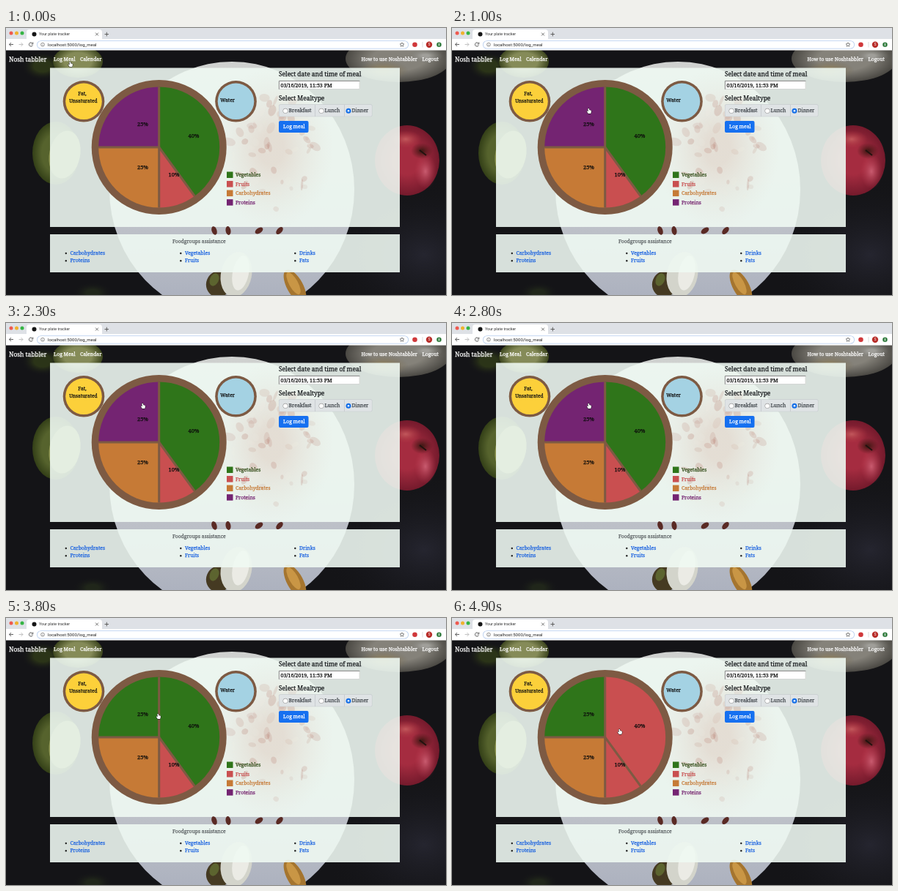
Recreate the animation shown at these times as an HTML page with a canvas. Size 600 by 365 pixels, loop 5000 ms.

```html
<!DOCTYPE html>
<html lang="en">
<head>
<meta charset="utf-8">
<title>Your plate tracker</title>
<style>
  html, body { margin: 0; width: 100%; height: 100%; overflow: hidden; background: #111; }
  canvas { display: block; width: 600px; height: 365px; }
</style>
</head>
<body>
<canvas id="stage"></canvas>
<script>
const W = 600, H = 365, LOOP = 5000, STEP = 100, TAU = Math.PI * 2;
const SERIF = '"Noto Serif", serif', SANS = 'Roboto, sans-serif';
const BROWN = '#7d5a43', BLUE = '#1a62e0', PANEL = 'rgba(240,250,243,.89)';
const FOOD = { veg: '#2f751a', fruit: '#c94f50', carb: '#c67a36', protein: '#742472' };

const dpr = window.devicePixelRatio || 1;
const stage = document.getElementById('stage');
const page = document.createElement('canvas');
for (const c of [stage, page]) {
  c.width = W * dpr;
  c.height = H * dpr;
  c.getContext('2d').scale(dpr, dpr);
}
const view = stage.getContext('2d');
let g = page.getContext('2d');

function rect(x, y, w, h, color, r = 0) {
  g.fillStyle = color;
  g.beginPath();
  g.roundRect(x, y, w, h, r);
  g.fill();
}

function oval(x, y, rx, ry, color, tilt = 0) {
  g.fillStyle = color;
  g.beginPath();
  g.ellipse(x, y, rx, ry, tilt, 0, TAU);
  g.fill();
}

const disc = (x, y, r, color) => oval(x, y, r, r, color);

function line(color, width, ...pts) {
  g.strokeStyle = color;
  g.lineWidth = width;
  g.beginPath();
  for (let i = 0; i < pts.length; i += 2) g.lineTo(pts[i], pts[i + 1]);
  g.stroke();
}

function ring(x, y, r, color, width, from = 0, to = TAU) {
  g.strokeStyle = color;
  g.lineWidth = width;
  g.beginPath();
  g.arc(x, y, r, from, to);
  g.stroke();
}

// A hairline stroke gives the serif text a medium weight
function text(str, x, y, size, color, { font = SERIF, align = 'left', ink = 0.25 } = {}) {
  g.font = `${size}px ${font}`;
  g.textAlign = align;
  g.fillStyle = g.strokeStyle = color;
  g.fillText(str, x, y);
  if (font === SERIF) {
    g.lineWidth = ink;
    g.strokeText(str, x, y);
  }
}

// Soft round glow, stretched to an ellipse
function glow(x, y, rx, ry, inner, outer, hold = 0) {
  g.save();
  g.translate(x, y);
  g.scale(1, ry / rx);
  const fill = g.createRadialGradient(0, 0, rx * hold, 0, 0, rx);
  fill.addColorStop(0, inner);
  fill.addColorStop(1, outer);
  disc(0, 0, rx, fill);
  g.restore();
}

function seeded(seed) {
  return () => (seed = (seed * 16807) % 2147483647) / 2147483647;
}

function drawPhoto() {
  rect(0, 0, W, H, '#141417');
  glow(570, 310, 140, 110, '#25252f', 'rgba(20,20,23,0)');
  // Avocados
  glow(50, 52, 30, 20, '#2b3418', 'rgba(20,20,23,0)', 0.4);
  glow(98, 46, 34, 22, '#858b58', '#3c451e', 0.55);
  glow(68, 171, 32, 43, '#56632d', '#333f17', 0.6);
  oval(80, 173, 21, 33, '#8c9450', 0.2);
  glow(118, 362, 28, 15, '#20261a', 'rgba(20,20,23,0)', 0.3);
  // Glass jar
  glow(535, 42, 72, 32, '#85827a', '#4a4843', 0.5);
  glow(515, 58, 34, 14, '#8d805f', 'rgba(120,110,90,0)', 0.2);
  glow(572, 38, 24, 10, '#a09f9a', 'rgba(120,120,115,0)', 0.2);
  // Apple
  glow(547, 181, 44, 48, '#a52c40', '#741a2c', 0.4);
  glow(572, 196, 15, 24, 'rgba(214,105,125,.8)', 'rgba(190,60,80,0)');
  glow(545, 152, 22, 12, 'rgba(205,100,100,.8)', 'rgba(190,60,70,0)');
  glow(567, 168, 15, 11, '#4a1a18', 'rgba(90,25,30,0)', 0.15);
  line('#21130f', 2, 564, 167, 573, 174);
  // Plate
  const shade = g.createLinearGradient(0, 46, 0, H);
  shade.addColorStop(0, '#cfd1cf');
  shade.addColorStop(0.6, '#c3c6cb');
  shade.addColorStop(1, '#adb2bf');
  oval(308, 221, 167, 175, shade);
}

function drawSalad() {
  const rnd = seeded(77);
  glow(362, 165, 85, 110, 'rgba(205,150,130,.24)', 'rgba(220,195,180,0)', 0.2);
  for (let i = 0; i < 70; i++) {
    const a = rnd() * TAU, d = Math.sqrt(rnd());
    const x = 360 + Math.cos(a) * d * 68, y = 168 + Math.sin(a) * d * 82;
    const tone = i % 3 ? '165,85,70' : '243,240,228';
    oval(x, y, 2 + rnd() * 7, 1.5 + rnd() * 4, `rgba(${tone},${0.07 + rnd() * 0.12})`, rnd() * 3);
  }
  for (const x of [284, 303, 345, 373]) oval(x, 277, 6, 3.5, '#5a2a24', x);
}

function drawTableware() {
  oval(290, 350, 17, 18, '#453a22', 0.4);
  oval(284, 344, 6, 9, '#5c642f', 0.4);
  oval(314, 337, 21, 31, '#d3d4cb', 0.2);
  oval(320, 335, 11, 24, '#ebebe5', 0.2);
  oval(394, 353, 11, 25, '#a5752f', -0.5);
  oval(392, 349, 6, 17, '#c99645', -0.5);
}

function drawBrowser() {
  rect(0, 0, W, 30, '#dee1e6');
  disc(7, 7, 2.5, '#ee5a50');
  disc(14.5, 7, 2.5, '#efb22e');
  disc(22, 7, 2.5, '#35b544');
  rect(28, 2, 103, 14, '#fff', [4, 4, 0, 0]);
  disc(38.5, 8.5, 3, '#151515');
  text('Your plate tracker', 45, 10.3, 5.4, '#333', { font: SANS });
  line('#555', 0.8, 122, 6.5, 126, 10.5);
  line('#555', 0.8, 126, 6.5, 122, 10.5);
  line('#555', 0.9, 134.5, 8.5, 140, 8.5);
  line('#555', 0.9, 137.3, 5.7, 137.3, 11.3);

  rect(0, 15, W, 15.5, '#fff');
  line('#555', 0.9, 10, 22.5, 4.5, 22.5);
  line('#555', 0.9, 7, 20, 4.5, 22.5, 7, 25);
  line('#bbb', 0.9, 17.5, 22.5, 23, 22.5);
  line('#bbb', 0.9, 20.5, 20, 23, 22.5, 20.5, 25);
  ring(34, 22.5, 2.6, '#555', 0.9, 0.4, 5.6);
  line('#555', 0.9, 36.8, 19.5, 36.8, 22, 34.5, 22);
  rect(42, 17.2, 507, 11.4, '#b4cbee', 5.7);
  rect(42.8, 18, 505.4, 9.8, '#fff', 4.9);
  ring(50, 22.7, 2.4, '#666', 0.7);
  line('#666', 0.7, 50, 22.4, 50, 24);
  text('localhost:5000/log_meal', 57, 24.8, 6.05, '#222', { font: SANS });

  g.beginPath();
  for (let i = 0; i < 10; i++) {
    const a = i * TAU / 10 - TAU / 4, r = i % 2 ? 1.4 : 3;
    g.lineTo(540 + Math.cos(a) * r, 22.8 + Math.sin(a) * r);
  }
  g.closePath();
  g.lineWidth = 0.7;
  g.strokeStyle = '#555';
  g.stroke();
  disc(557.5, 22.7, 3.3, '#d0383a');
  line('#ccc', 0.7, 568, 19, 568, 26.5);
  disc(577, 22.7, 4.2, '#b82d29');
  text('S', 577, 24.4, 4.6, '#fff', { font: SANS, align: 'center' });
  disc(590.5, 22.7, 3.3, '#388044');
  line('#fff', 0.9, 590.5, 24.4, 590.5, 21);
}

function drawNav() {
  const right = { align: 'right' };
  text('Nosh tabbler', 4, 46, 8.4, '#fff');
  text('Log Meal', 65, 45, 6.8, '#fff');
  text('Calendar', 101, 45, 6.8, '#fff');
  text('How to use Noshtabbler', 561, 45, 6.7, '#fff', right);
  text('Logout', 590, 45, 6.8, '#fff', right);
}

function drawForm() {
  text('Select date and time of meal', 372, 66.3, 8.4, '#16191c');
  rect(372, 72, 110.5, 12, '#fff');
  line('#777', 0.9, 372.4, 84, 372.4, 72.4, 482.5, 72.4);
  line('#c4c8c6', 0.8, 482.1, 72.5, 482.1, 83.6, 372.5, 83.6);
  text('03/16/2019, 11:53 PM', 374.5, 80.7, 7.1, '#111');
  text('Select Mealtype', 372, 99.3, 8.4, '#16191c');

  rect(372, 104.3, 127.5, 17, '#c8cdd0', 2);
  rect(372.6, 104.9, 126.3, 15.8, '#dfe3e5', 1.6);
  line('#c3c8cb', 0.8, 421.5, 105, 421.5, 121);
  line('#c3c8cb', 0.8, 461.5, 105, 461.5, 121);
  for (const [label, x] of [['Breakfast', 381], ['Lunch', 430], ['Dinner', 467]]) {
    const on = label === 'Dinner';
    disc(x, 113.3, 3.5, on ? '#1670e8' : '#999');
    disc(x, 113.3, on ? 1.3 : 2.9, '#fff');
    text(label, x + 4.6, 115.3, 6.8, '#43494e');
  }
  rect(372, 127, 40.5, 16, '#1670f0', 2);
  text('Log meal', 378, 137.3, 6.8, '#fff');
}

function drawLegend() {
  const rows = [['Vegetables', 'veg', '#35531f'], ['Fruits', 'fruit'], ['Carbohydrates', 'carb'], ['Proteins', 'protein']];
  rows.forEach(([label, kind, ink], i) => {
    const y = 196.5 + i * 12.55;
    rect(301, y, 8.5, 8.5, FOOD[kind]);
    text(label, 313, y + 6.7, 6.8, ink || FOOD[kind]);
  });
}

function drawHelp() {
  text('Foodgroups assistance', 227, 293.7, 6.8, '#5a5f62');
  const columns = [[87.5, 'Carbohydrates', 'Proteins'], [244, 'Vegetables', 'Fruits'], [400, 'Drinks', 'Fats']];
  for (const [x, ...links] of columns) {
    links.forEach((label, i) => {
      const y = 310 + i * 10.3;
      disc(x - 5.7, y - 2, 1.2, '#222');
      text(label, x, y, 6.8, BLUE);
    });
  }
}

function drawCup(x, color) {
  disc(x, 100.3, 28.3, BROWN);
  disc(x, 100.3, 24.8, color);
}

function drawPage() {
  drawPhoto();
  drawTableware();
  rect(60, 54.5, 477, 217.5, PANEL);
  rect(60, 282, 477, 52, PANEL);
  drawSalad();
  drawBrowser();
  drawNav();
  drawForm();
  drawLegend();
  drawHelp();
  drawCup(106, '#fcd03a');
  text('Fat,', 104, 92, 6.7, '#111', { align: 'center' });
  text('Unsaturated', 105.3, 101.5, 6.5, '#111', { align: 'center' });
  drawCup(313.5, '#a4d2e3');
  text('Water', 292.3, 100.7, 6.8, '#111');
}

function drawPie(slices) {
  const cx = 208.7, cy = 163, r = 82.5;
  disc(cx, cy, 92, BROWN);
  let from = -TAU / 4;
  const edges = [];
  for (const [share, color] of slices) {
    const to = from + share * TAU;
    g.fillStyle = color;
    g.beginPath();
    g.moveTo(cx, cy);
    g.arc(cx, cy, r, from, to);
    g.fill();
    edges.push(from);
    from = to;
  }
  for (const a of edges) line(BROWN, 3, cx, cy, cx + Math.cos(a) * r, cy + Math.sin(a) * r);
  text('40%', 248.5, 150.3, 7.4, '#0c0c0c');
  text('10%', 221.5, 203.2, 7.4, '#0c0c0c');
  text('25%', 179, 193.3, 7.4, '#0c0c0c');
  text('25%', 179, 133.7, 7.4, '#0c0c0c');
}

const hand = new Path2D('M-1.6-3.2Q-.8-4 0-3.2L.3-1.2Q2.8-1.3 3 .2L2.5 2.8L2 3.6H-1.2L-3 .8Q-3.2-.4-1.3.5Z');

function drawHand(x, y) {
  g.save();
  g.translate(x, y);
  g.lineWidth = 1;
  g.strokeStyle = '#111';
  g.stroke(hand);
  g.fillStyle = '#fff';
  g.fill(hand);
  g.restore();
}

// Cursor stops: time, x, y
const path = [[0, 88, 49.7], [200, 88, 49.7], [800, 187, 113.5], [3500, 187, 113.5], [4100, 229, 155.5], [LOOP, 229, 155.5]];

function cursorAt(t) {
  const i = path.findIndex(p => p[0] > t);
  const [t0, x0, y0] = path[i - 1], [t1, x1, y1] = path[i];
  const k = (t - t0) / (t1 - t0), e = k * k * (3 - 2 * k);
  return [x0 + (x1 - x0) * e, y0 + (y1 - y0) * e];
}

function frame(now) {
  const t = Math.floor((now % LOOP) / STEP) * STEP;
  view.drawImage(page, 0, 0, W, H);
  drawPie([
    [0.4, t < 4600 ? FOOD.veg : FOOD.fruit],
    [0.1, FOOD.fruit],
    [0.25, FOOD.carb],
    [0.25, t < 3100 ? FOOD.protein : FOOD.veg],
  ]);
  drawHand(...cursorAt(t));
  requestAnimationFrame(() => frame(performance.now() - start));
}

drawPage();
g = view;
const start = performance.now();
frame(0);
</script>
</body>
</html>
```
